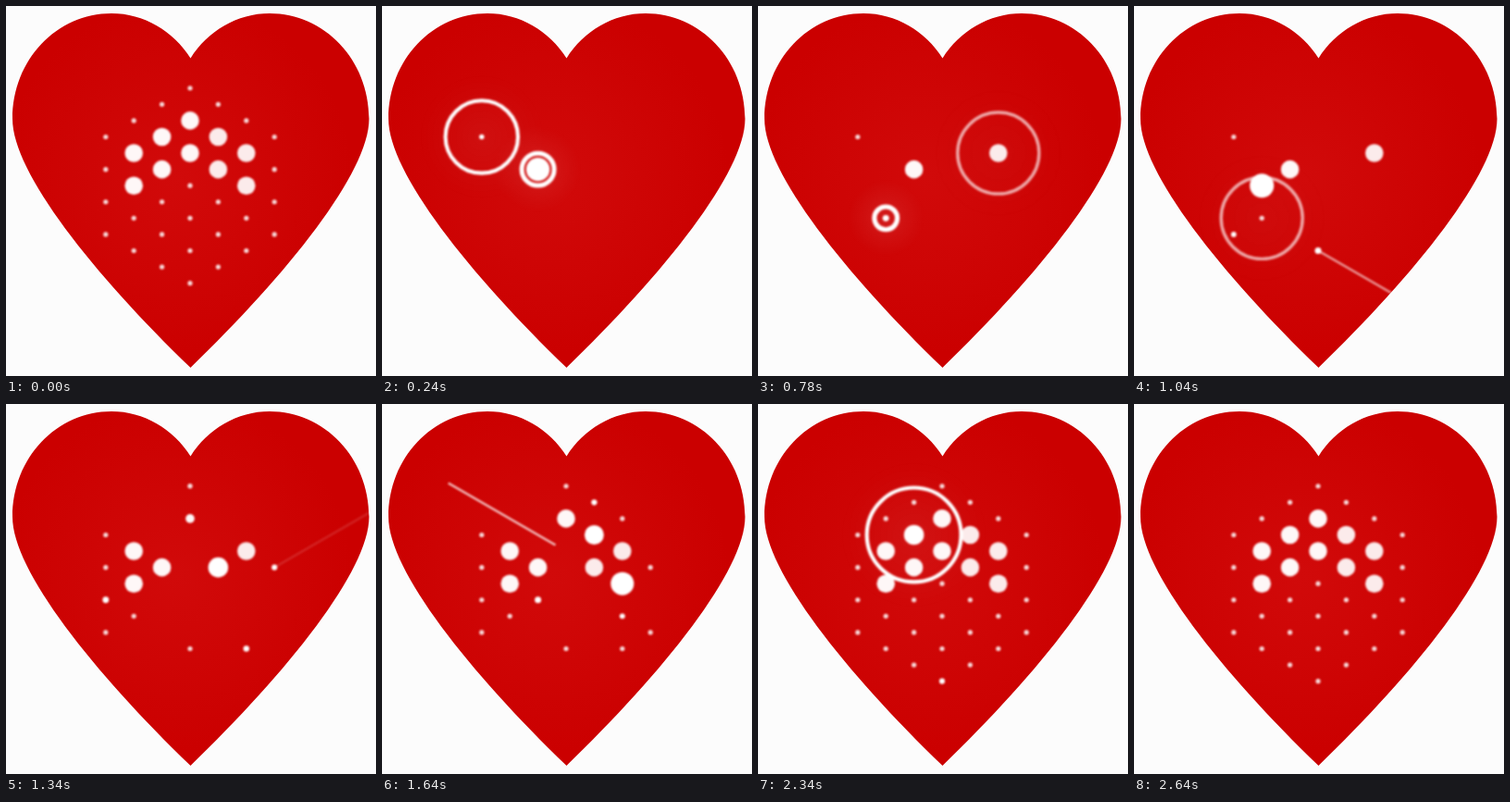
These frames come from a looping animation (400x400 px, 4.02 s). An HTML page with a canvas:

```html
<!DOCTYPE html>
<html lang="en">
<head>
<meta charset="utf-8">
<title>Heart dots</title>
<style>
html, body { margin: 0; width: 100%; height: 100%; overflow: hidden; background: #fcfcfc; }
svg, canvas { position: absolute; left: 0; top: 0; width: 100vw; height: 100vh; }
canvas { filter: blur(0.8px); }
</style>
</head>
<body>
<svg viewBox="0 0 400 400">
  <radialGradient id="red" gradientUnits="userSpaceOnUse" cx="185" cy="185" r="190">
    <stop offset="0" stop-color="#d10a0a"/>
    <stop offset="1" stop-color="#cb0000"/>
  </radialGradient>
  <path id="heart" fill="url(#red)" d="M199.5 56.5C181 27 149 8 114 8C55 8 7 58 7 122
    C7 180 95 290 199.5 391C304 290 392.5 180 392.5 122C392.5 58 344 8 285 8C250 8 218 27 199.5 56.5Z"/>
</svg>
<canvas id="stage" width="400" height="400"></canvas>
<script>
const ctx = document.getElementById('stage').getContext('2d');
const heart = new Path2D(document.getElementById('heart').getAttribute('d'));
const LOOP = 4020, CLEAR = 40;

// Hexagonal lattice, column by column
const dots = [];
for (let c = -3; c <= 3; c++) {
  const n = 7 - Math.abs(c);
  for (let r = 0; r < n; r++) {
    dots.push({ x: 199 + c * 30.4, y: 194.2 + 35.15 * (r - (n - 1) / 2), r: 2.6, alpha: 0.85 });
  }
}
for (const i of [5, 6, 10, 11, 16, 17, 23, 24, 29, 30]) {
  dots[i].r = 9.8;
  dots[i].alpha = dots[i].x > 210 ? 0.92 : 0.97;
}

// Slow start, then a steady beat
const order = [0, 11, 29, 7, 3, 6, 20, 5, 1, 15, 24, 34, 32, 2, 16, 28, 36, 23, 31, 22, 30, 12,
  17, 9, 8, 35, 13, 25, 4, 18, 27, 33, 26, 19, 14, 10, 21];
const opening = [40, 180, 480, 740, 880, 1000, 1010];
order.forEach((id, i) => { dots[id].at = opening[i] ?? 1050 + 40 * (i - opening.length); });

for (const i of [0, 11, 29, 7]) dots[i].ring = { size: 44.7, life: 400 };
dots[10].ring = { size: 58.8, life: 350 };

// Angle pointing from the dot back to where its streak begins
const streaks = { 20: 30, 34: -30, 17: 210, 25: 90 };
for (const i in streaks) dots[i].angle = streaks[i] * Math.PI / 180;

const white = a => `rgba(255,255,255,${a})`;

function popScale(age) {
  if (age < 30) return 1.35 * age / 30;
  return 1 + 0.35 * Math.max(0, 1 - (age - 30) / 200);
}

function circle(d, r) {
  ctx.beginPath();
  ctx.arc(d.x, d.y, r, 0, 7);
}

function disc(d, scale) {
  ctx.fillStyle = white(scale > 1.05 ? 1 : d.alpha);
  circle(d, d.r * scale);
  ctx.fill();
}

function glow(d, r, alpha) {
  const g = ctx.createRadialGradient(d.x, d.y, 0, d.x, d.y, r);
  g.addColorStop(0, white(alpha));
  g.addColorStop(1, white(0));
  ctx.fillStyle = g;
  circle(d, r);
  ctx.fill();
}

function ring(d, age) {
  const p = age / d.ring.life;
  if (p <= 0 || p >= 1) return;
  const r = d.ring.size * (1 - (1 - p) ** 3);
  glow(d, r + 30, 0.09 * (1 - p));
  ctx.strokeStyle = white(Math.min(1, (1 - p) * 2.6));
  ctx.lineWidth = 5.4 - 2.6 * p;
  circle(d, r);
  ctx.stroke();
}

function streak(d, age) {
  const far = 147, travel = 100, fade = 160;
  if (age <= -travel || age >= fade) return;
  const near = far * Math.max(0, -age / travel);
  const ux = Math.cos(d.angle), uy = Math.sin(d.angle);
  ctx.strokeStyle = white(0.75 * Math.min(1, 1 - age / fade));
  ctx.lineWidth = 2.4;
  ctx.beginPath();
  ctx.moveTo(d.x + ux * far, d.y + uy * far);
  ctx.lineTo(d.x + ux * near, d.y + uy * near);
  ctx.stroke();
}

function draw(t) {
  ctx.clearRect(0, 0, 400, 400);
  for (const d of dots) {
    const age = t < CLEAR ? LOOP : t - d.at;
    if (d.angle !== undefined) streak(d, age);
    if (d.ring) ring(d, age);
    if (age > 0) disc(d, popScale(age));
  }
}

ctx.clip(heart);
const start = performance.now();
function tick() {
  draw((performance.now() - start) % LOOP);
  requestAnimationFrame(tick);
}
tick();
</script>
</body>
</html>
```
